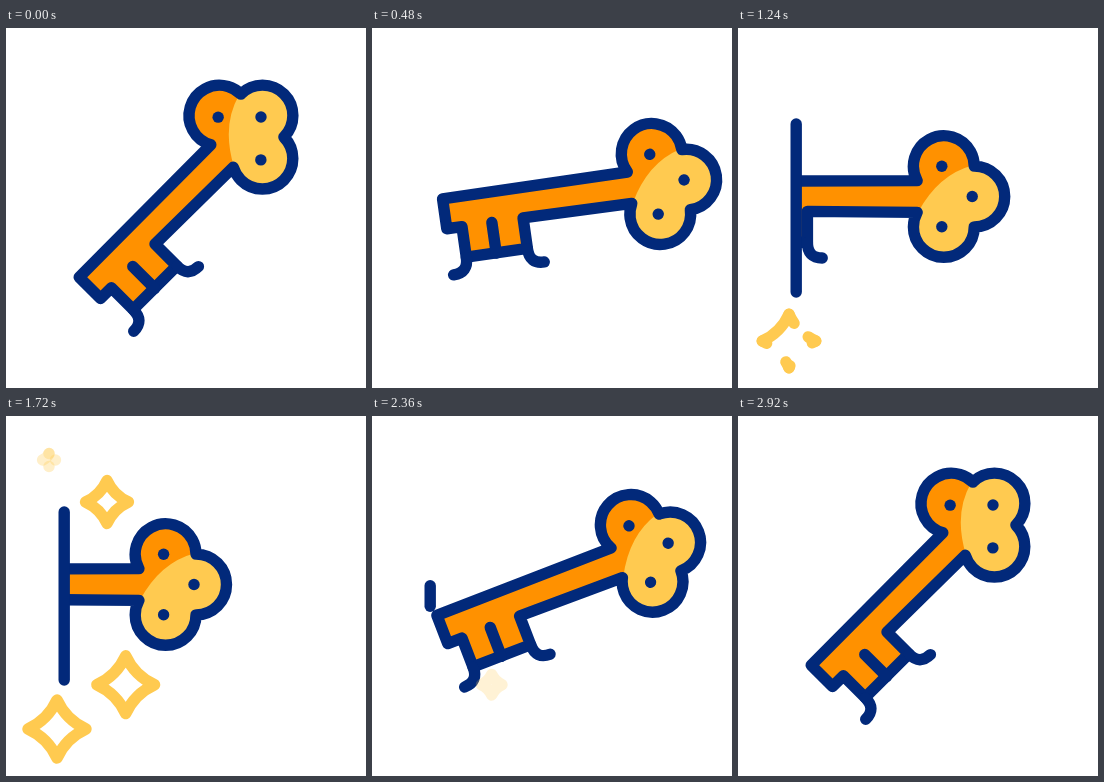
An HTML page with a canvas for the animation above (3 s loop, 360 by 360 pixels).

```html
<!DOCTYPE html>
<html lang="en">
<head>
<meta charset="utf-8">
<title>Key</title>
<style>
  html, body { margin: 0; width: 100%; height: 100%; overflow: hidden; background: #fff; }
  canvas { display: block; width: 360px; height: 360px; }
</style>
</head>
<body>
<canvas id="stage" width="360" height="360"></canvas>
<script>
const ctx = document.getElementById('stage').getContext('2d');
const LOOP = 3000, NAVY = '#02297a', ORANGE = '#ff9100', YELLOW = '#ffca50', LINE = 11.4;

// Key space: x runs along the shaft, origin at the middle dot of the head.
const ANCHOR = { x: -103, y: 20 };
const REST = { x: 196.3, y: 176 }, LEVEL = { x: 216.6, y: 188.5 };
const WALL = { x: 58.2, mid: 180, half: 84 };
const LOBE = 30.4;

const clamp = v => Math.min(1, Math.max(0, v));
const mix = (a, b, p) => a + (b - a) * p;
const smooth = p => p * p * (3 - 2 * p);

// Cubic easing with control points (x1, 0) and (x2, 1), solved by bisection.
function ease(x1, x2) {
  return x => {
    let lo = 0, hi = 1;
    for (let i = 0; i < 24; i++) {
      const s = (lo + hi) / 2, r = 1 - s;
      if (3 * r * r * s * x1 + 3 * r * s * s * x2 + s * s * s < x) lo = s; else hi = s;
    }
    return smooth(lo);
  };
}
const swing = ease(0.5, 0), push = ease(0.5, 0.3);
const phase = (t, from, to, easing) => easing(clamp((t - from) / (to - from)));

function keyOutline() {
  const p = new Path2D(), c = -28.4, d = 30.4, a = 2.643;
  p.arc(c, -d, LOBE, a, 2 * Math.PI);
  p.arc(2.1, 0, LOBE, -Math.PI / 2, Math.PI / 2);
  p.arc(c, d, LOBE, 0, 2 * Math.PI - a);
  for (const [x, y] of [[-164.8, 14.9], [-164.8, 45.7], [-226.5, 45.7], [-226.5, 14.9], [-241.8, 14.9], [-241.8, -15.3]])
    p.lineTo(x, y);
  p.closePath();
  return p;
}
const outline = keyOutline();
const shine = new Path2D('M0-31Q-33.8-21.9-54 15.5L-80 16V75H60V-31Z');
const details = new Path2D('M-196.3 15V46M-226.5 46Q-226.5 61.5-241.5 61.5M-164.8 46Q-164.8 61.5-150 61.5');

function drawKey(level, shift) {
  ctx.save();
  ctx.beginPath();
  ctx.rect(WALL.x, 0, 360, 360);
  ctx.clip();
  ctx.translate(mix(REST.x, LEVEL.x, level) + shift, mix(REST.y, LEVEL.y, level));
  ctx.rotate((level - 1) * Math.PI / 4);
  ctx.translate(-ANCHOR.x, -ANCHOR.y);

  ctx.fillStyle = ORANGE;
  ctx.fill(outline);
  ctx.save();
  ctx.clip(outline);
  ctx.fillStyle = YELLOW;
  ctx.fill(shine);
  ctx.restore();

  ctx.strokeStyle = ctx.fillStyle = NAVY;
  ctx.stroke(outline);
  ctx.stroke(details);
  for (const [x, y] of [[-30.4, -30.2], [0, 0], [-30.4, 30.2]]) {
    ctx.beginPath();
    ctx.arc(x, y, 5.7, 0, 2 * Math.PI);
    ctx.fill();
  }
  ctx.restore();
}

function drawWall(size) {
  if (size <= 0) return;
  ctx.strokeStyle = NAVY;
  ctx.beginPath();
  ctx.moveTo(WALL.x, WALL.mid - WALL.half * size);
  ctx.lineTo(WALL.x, WALL.mid + WALL.half * size);
  ctx.stroke();
}

const sparkles = [
  { x: 51, y: 313, start: 1100, life: 890 },
  { x: 101, y: 86, start: 1285, life: 890 },
  { x: 119.7, y: 268.7, start: 1490, life: 890 },
  { x: 43, y: 44, start: 1690, life: 490 }
];

function sparkleScale(age, life) {
  const left = life - age;
  if (age < 180) return mix(0.15, 1, smooth(age / 180));
  if (left < 210) return mix(0.33, 1, smooth(left / 210));
  if (life < 600) return 1;
  return age < 430
    ? mix(1, 0.72, smooth((age - 180) / 250))
    : mix(0.72, 1, smooth(clamp((age - 430) / 235)));
}

// The line keeps its weight while the star changes size.
function drawSparkle({ x, y, start, life }, t) {
  const age = t - start;
  if (age <= 0 || age >= life) return;
  const scale = sparkleScale(age, life), tip = 29.8 * scale, waist = 9.3 * scale, length = 45 * scale;
  ctx.save();
  ctx.globalAlpha = clamp(age / 100) * clamp((life - age) / 80);
  ctx.translate(x, y);
  ctx.strokeStyle = YELLOW;
  // Each side grows from its two tips and closes at its own moment.
  const gaps = [60, 195, 230, 215].map(closing => clamp((closing - age) / 110));
  if (gaps.every(gap => gap === 0)) {
    ctx.beginPath();
    ctx.moveTo(-tip, 0);
    ctx.quadraticCurveTo(-waist, -waist, 0, -tip);
    ctx.quadraticCurveTo(waist, -waist, tip, 0);
    ctx.quadraticCurveTo(waist, waist, 0, tip);
    ctx.quadraticCurveTo(-waist, waist, -tip, 0);
    ctx.closePath();
    ctx.stroke();
  } else {
    for (const gap of gaps) {
      const stub = (1 - gap) / 2 * length;
      ctx.setLineDash(gap ? [stub, gap * length] : []);
      ctx.beginPath();
      ctx.moveTo(-tip, 0);
      ctx.quadraticCurveTo(-waist, -waist, 0, -tip);
      ctx.stroke();
      ctx.rotate(Math.PI / 2);
    }
  }
  ctx.restore();
}

function draw(t) {
  ctx.fillStyle = '#fff';
  ctx.fillRect(0, 0, 360, 360);
  ctx.lineWidth = LINE;
  ctx.lineCap = ctx.lineJoin = 'round';

  const level = phase(t, 200, 800, swing) - phase(t, 2120, 2912, swing);
  const depth = phase(t, 800, 1700, push) - phase(t, 1738, 2102, smooth);
  const wall = phase(t, 800, 1130, smooth) - phase(t, 2100, 2434, smooth);

  drawKey(level, -131.6 * depth);
  drawWall(wall);
  for (const s of sparkles) drawSparkle(s, t);
}

const origin = performance.now();
function tick() {
  draw((performance.now() - origin) % LOOP);
  requestAnimationFrame(tick);
}
tick();
</script>
</body>
</html>
```
